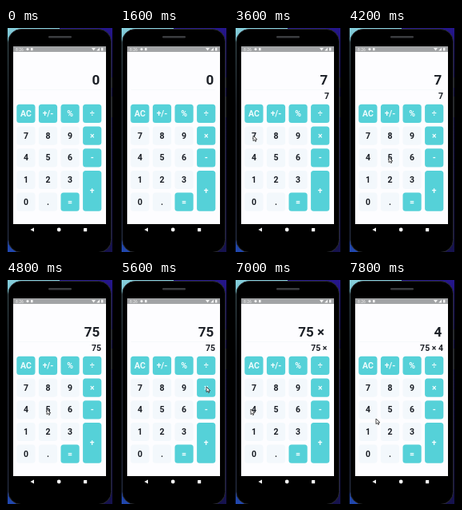
Write an HTML page that moves like this. It is 135 by 281 pixels and loops after 8000 ms.

```html
<!DOCTYPE html>
<html lang="en">
<head>
<meta charset="utf-8">
<title>Calculator</title>
<style>
  html, body { margin: 0; width: 100%; height: 100%; overflow: hidden; background: #000; }
  svg { display: block; width: 100vw; height: 100vh; }
  text { font-family: Roboto, Arial, sans-serif; font-weight: 700; fill: #1b1f26; white-space: pre; }
  .key { font-size: 10.5px; text-anchor: middle; }
  .op { fill: #effcfd; }
  .out { text-anchor: end; }
</style>
</head>
<body>
<svg viewBox="0 0 135 281" preserveAspectRatio="none">
  <defs>
    <linearGradient id="left" x2="0" y2="1">
      <stop offset="0" stop-color="#86cfdc"/>
      <stop offset=".12" stop-color="#5fa9b8"/>
      <stop offset=".35" stop-color="#10243c"/>
      <stop offset=".75" stop-color="#14205c"/>
      <stop offset="1" stop-color="#2148b0"/>
    </linearGradient>
    <linearGradient id="right" x2="0" y2="1">
      <stop offset="0" stop-color="#25168c"/>
      <stop offset=".3" stop-color="#140f4c"/>
      <stop offset="1" stop-color="#16124e"/>
    </linearGradient>
  </defs>
  <rect width="135" height="281"/>
  <rect x="2" width="66" height="281" fill="url(#left)"/>
  <rect x="67" width="66" height="281" fill="url(#right)"/>

  <!-- phone -->
  <path d="M131 62h2v13h-2zM131 86h2v26h-2z" fill="#25272b"/>
  <rect x="2.8" y="1.5" width="128.8" height="280" rx="16" stroke="#2c2e32"/>
  <rect x="53" y="10" width="29" height="2.6" rx="1.3" fill="#3b3d40"/>

  <!-- screen -->
  <rect x="9" y="23" width="116" height="239" fill="#fdfdff"/>
  <rect x="9" y="23" width="116" height="7" fill="#a2a4a6"/>
  <text x="12" y="28.5" style="font-size:5px;font-weight:500;fill:#e4e4e4">8:26</text>
  <g fill="#f4f4f4">
    <circle cx="27" cy="26.6" r="1.6"/>
    <rect x="31" y="25" width="2.6" height="3.2"/>
    <path d="M107 25h5l-2.5 3.4zM117 24.6v3.8h-3.8zM119 24.8h2.4v3.7H119z"/>
  </g>
  <path d="M14 77.5H119" stroke="#f6f8fa"/>

  <!-- navigation -->
  <rect x="9" y="246" width="116" height="16"/>
  <g fill="#f5f5f5">
    <path d="M35 250.4v5.2l-4.6-2.6z"/>
    <circle cx="66.2" cy="253" r="2.4"/>
    <rect x="97" y="251" width="4.2" height="4.2" rx=".4"/>
  </g>

  <g id="keys"></g>
  <text id="big" class="out" x="117.2" y="71" font-size="17"></text>
  <text id="small" class="out" x="119" y="88.8" font-size="10.5"></text>
  <path id="mouse" d="M0 0V6.6L1.6 5.3L2.7 7.5L3.7 7L2.7 4.9H4.8Z" fill="#fff" stroke="#222" stroke-width=".8"/>
</svg>
<script>
  const LOOP = 8000, TICK = 200;
  const $ = id => document.getElementById(id);

  function add(tag, attrs, label = '') {
    const el = document.createElementNS('http://www.w3.org/2000/svg', tag);
    for (const name in attrs) el.setAttribute(name, attrs[name]);
    el.textContent = label;
    $('keys').append(el);
  }

  const rows = [
    ['AC', '+/-', '%', '÷'],
    ['7', '8', '9', '×'],
    ['4', '5', '6', '-'],
    ['1', '2', '3', '+'],
    ['0', '.', '=']
  ];
  rows.forEach((row, r) => row.forEach((label, c) => {
    const x = 13.3 + c * 27.6, y = 95.8 + r * 27.7;
    const h = label === '+' ? 50.9 : 23.2;
    const teal = r === 0 || c === 3 || label === '=';
    add('rect', { x, y, width: 23.2, height: h, rx: 3.5, fill: teal ? '#55d1d8' : '#f3f8fc' });
    add('text', { x: x + 11.6, y: y + h / 2 + 3.6, class: teal ? 'key op' : 'key' }, label);
  }));

  // start time, large line, small line
  const lines = [
    [0, '0', ''],
    [3600, '7', '7'],
    [4800, '75', '75'],
    [6000, '75 × ', '75 × '],
    [7400, '4', '75 × 4']
  ];

  // time, x, y of the pointer tip
  const path = [
    [2000, 136, 210], [2800, 62, 162], [3200, 24, 135], [3600, 24, 135],
    [4200, 51, 162], [5000, 51, 162], [5600, 108, 134], [6200, 108, 136],
    [7000, 21, 162], [7600, 21, 162], [7800, 35, 174], [8000, 35, 174]
  ];

  const ease = u => u * u * (3 - 2 * u);

  function pointer(t) {
    const i = path.findIndex(p => p[0] > t);
    if (i < 1) return null;
    const [t0, x0, y0] = path[i - 1], [t1, x1, y1] = path[i];
    const u = ease((t - t0) / (t1 - t0));
    return [x0 + (x1 - x0) * u, y0 + (y1 - y0) * u];
  }

  function draw(now) {
    const t = Math.floor(now % LOOP / TICK) * TICK;
    const [, big, small] = lines.filter(l => l[0] <= t).pop();
    $('big').textContent = big;
    $('small').textContent = small;
    const at = pointer(t);
    $('mouse').setAttribute('visibility', at ? 'visible' : 'hidden');
    if (at) $('mouse').setAttribute('transform', `translate(${at})`);
  }

  const start = performance.now();
  function loop() {
    draw(performance.now() - start);
    requestAnimationFrame(loop);
  }
  loop();
</script>
</body>
</html>
```
